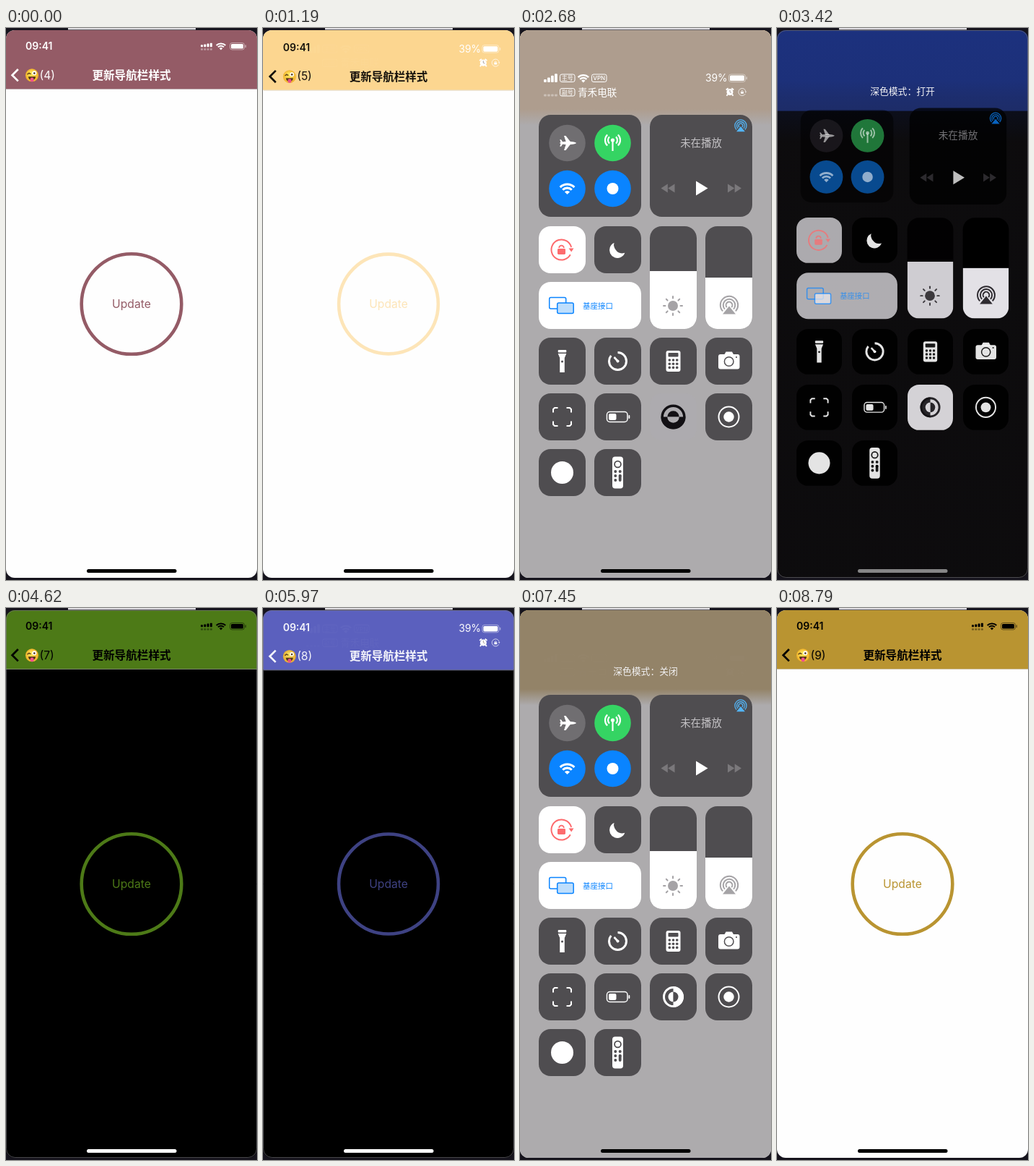
Animation of 348 by 763 pixels, one loop 9690 ms. Source, as an HTML page with a canvas:

```html
<!DOCTYPE html>
<html lang="zh">
<head>
<meta charset="utf-8">
<title>更新导航栏样式</title>
<style>
html, body { margin: 0; width: 100%; height: 100%; overflow: hidden; background: #16141d; }
canvas { display: block; width: 348px; height: 763px; }
</style>
</head>
<body>
<canvas id="stage"></canvas>
<script>
const W = 348, H = 763, LOOP = 9690, STEP = LOOP / 65, TAU = Math.PI * 2;
const canvas = document.getElementById('stage');
const dpr = window.devicePixelRatio || 1;
canvas.width = W * dpr;
canvas.height = H * dpr;
const g = canvas.getContext('2d');
const FONT = 'Inter, "Noto Sans CJK SC", "Noto Sans CJK", sans-serif';
const CJK = '"Noto Sans CJK SC", "Noto Sans CJK", sans-serif';

const WHITE = [255, 255, 255], BLACK = [0, 0, 0], BLUE = '#0a84ff';
const PALE = [236, 234, 239], GREY_TILE = [79, 77, 80];

// Each update of the bar: start, fade time, tint, foreground, dark mode
const STATES = [
  { at: 0, dur: 1, tint: [148, 91, 102], fg: WHITE, dark: 0 },
  { at: 120, dur: 400, tint: [252, 214, 144], fg: BLACK, dark: 0 },
  { at: 2720, dur: 320, tint: [28, 49, 126], fg: WHITE, dark: 1 },
  { at: 4150, dur: 320, tint: [77, 122, 23], fg: BLACK, dark: 1 },
  { at: 4640, dur: 400, tint: [91, 96, 190], fg: WHITE, dark: 1 },
  { at: 7140, dur: 320, tint: [185, 148, 49], fg: BLACK, dark: 0 }
];

const clamp = v => Math.max(0, Math.min(1, v));
const lerp = (a, b, k) => a + (b - a) * k;
const mix = (a, b, k) => a.map((v, i) => lerp(v, b[i], k));
const rgb = (c, a = 1) => `rgba(${c.map(Math.round).join()},${a})`;
function ease(t, at, dur) {
  const u = clamp((t - at) / dur);
  return u * u * (3 - 2 * u);
}

function faded(alpha, draw) {
  if (alpha <= 0) return;
  g.save();
  g.globalAlpha *= alpha;
  draw();
  g.restore();
}
function moved(x, y, draw, scale = 1, turn = 0) {
  g.save();
  g.translate(x, y);
  g.rotate(turn);
  g.scale(scale, scale);
  draw();
  g.restore();
}
function ink(color, width = 1) {
  g.fillStyle = g.strokeStyle = color;
  g.lineWidth = width;
}
function box(x, y, w, h, r) {
  g.beginPath();
  g.roundRect(x, y, w, h, r);
}
function fillBox(x, y, w, h, r = 0) { box(x, y, w, h, r); g.fill(); }
function lineBox(x, y, w, h, r = 0) { box(x, y, w, h, r); g.stroke(); }
function dot(x, y, r) { g.beginPath(); g.arc(x, y, r, 0, TAU); g.fill(); }
function arc(x, y, r, from = 0, to = TAU) { g.beginPath(); g.arc(x, y, r, from, to); g.stroke(); }
function path(points, close) {
  g.beginPath();
  points.forEach(([x, y]) => g.lineTo(x, y));
  if (close) { g.closePath(); g.fill(); } else g.stroke();
}
function text(s, x, y, size, weight = 400, align = 'left', font = FONT) {
  g.font = `${weight} ${size}px ${font}`;
  g.textAlign = align;
  g.textBaseline = 'alphabetic';
  g.fillText(s, x, y);
}

// ---- icons, drawn in the current ink ----
function wifi(x, y, r) {
  const a = -Math.PI * .75, b = -Math.PI * .25;
  g.lineWidth = r * .2;
  arc(x, y, r * .9, a, b);
  arc(x, y, r * .57, a, b);
  g.beginPath();
  g.moveTo(x, y);
  g.arc(x, y, r * .33, a, b);
  g.fill();
}
function battery(x, y, w, h) {
  faded(.45, () => {
    g.lineWidth = 1;
    lineBox(x + .5, y + .5, w - 3, h - 1, 3);
    fillBox(x + w - 1.5, y + h / 2 - 2, 1.5, 4, 1);
  });
  fillBox(x + 2, y + 2, w - 6, h - 4, 1.6);
}
function airplay(x, y, scale, color) {
  moved(x, y, () => {
    ink(color, 2);
    for (const r of [4.4, 8.3, 12.2]) arc(0, 0, r, Math.PI * .76, Math.PI * 2.24);
    path([[0, 1.5], [9, 12.5], [-9, 12.5]], true);
  }, scale);
}
function plane(x, y) {
  moved(x, y, () => {
    g.beginPath();
    g.ellipse(0, 0, 11.5, 2.2, 0, 0, TAU);
    g.fill();
    for (const s of [-1, 1]) {
      path([[4, s], [-3, 10 * s], [-5.5, 10 * s], [-2.5, s]], true);
      path([[-7, s], [-9.5, 4.8 * s], [-11.3, 4.8 * s], [-10, s]], true);
    }
  });
}
function antenna(x, y) {
  dot(x, y - 3, 2.6);
  g.lineWidth = 2.2;
  path([[x, y - 2], [x, y + 12]]);
  for (const r of [6.5, 10.5]) {
    arc(x, y - 3, r, -.8, .8);
    arc(x, y - 3, r, Math.PI - .8, Math.PI + .8);
  }
}
function rotationLock(x, y, scale) {
  moved(x, y, () => {
    g.lineWidth = 2;
    arc(0, 0, 14, .5, TAU - .25);
    path([[10, -2], [17, -2], [13.7, 3]], true);
    fillBox(-5.5, -1.5, 11, 8, 1.4);
    g.lineWidth = 1.8;
    arc(0, -2.5, 3.3, Math.PI, TAU);
  }, scale);
}
function alarm(x, y) {
  dot(x, y, 4.5);
  g.lineWidth = 1.8;
  for (const s of [-1, 1]) {
    path([[x + 2.3 * s, y - 5.2], [x + 5.2 * s, y - 3]]);
    path([[x + 3 * s, y + 3], [x + 4.5 * s, y + 5.2]]);
  }
  g.strokeStyle = '#a09590';
  g.lineWidth = .9;
  path([[x, y - 2.8], [x, y], [x + 2, y + 1]]);
}
function sun(x, y) {
  dot(x, y, 7);
  g.lineWidth = 2;
  g.lineCap = 'round';
  for (let i = 0; i < 8; i++) {
    const a = i * TAU / 8, c = Math.cos(a), s = Math.sin(a);
    path([[x + c * 10.5, y + s * 10.5], [x + c * 13, y + s * 13]]);
  }
}
function moon(x, y) {
  g.beginPath();
  g.arc(x, y, 11, -2, 0.35, true);
  g.quadraticCurveTo(x + 2, y + 6, x - 2, y);
  g.quadraticCurveTo(x - 6, y - 5, x - 4.5, y - 10);
  g.fill();
}
function halves(color, paper, x, y, scale, turn) {
  moved(x, y, () => {
    ink(color, 3);
    g.beginPath(); g.arc(0, 0, 14.3, Math.PI / 2, Math.PI * 1.5); g.fill();
    g.beginPath(); g.arc(0, 0, 7, -Math.PI / 2, Math.PI / 2); g.fill();
    g.fillStyle = paper;
    g.beginPath(); g.arc(0, 0, 7, Math.PI / 2, Math.PI * 1.5); g.fill();
    arc(0, 0, 13);
  }, scale, turn);
}
function emoji(x, y) {
  moved(x, y, () => {
    const skin = g.createRadialGradient(-1, -3, 1, 0, 0, 9.5);
    skin.addColorStop(0, '#ffe95a');
    skin.addColorStop(1, '#f0ad25');
    g.fillStyle = skin;
    dot(0, 0, 9);
    ink('#5a3a14', 1.4);
    path([[-6.5, -1.2], [-4, -3], [-1.6, -1.6]]);
    g.fillStyle = '#fff';
    dot(3.3, -3, 3);
    g.fillStyle = '#4a3013';
    dot(3.3, -2.8, 1.3);
    g.beginPath(); g.arc(0, 2, 5, 0, Math.PI); g.fill();
    g.fillStyle = '#f0508f';
    fillBox(-2.4, 3.2, 5, 5.8, 2.4);
  });
}

// ---- app page: shrinks and blurs behind the control centre ----
function drawApp(s) {
  const tint = rgb(s.tint), fg = rgb(s.fg), p = s.open, scale = 1 - .15 * p;
  const shown = clamp(1 - 2 * p);
  g.fillStyle = rgb(mix([254, 254, 254], BLACK, s.dark));
  g.fillRect(0, 0, W, H);
  g.fillStyle = tint;
  g.fillRect(0, 0, W, lerp(H / 2, 84, scale));
  faded(shown, () => {
    g.translate(W / 2, H / 2);
    g.scale(scale, scale);
    g.translate(-W / 2, -H / 2);
    if (p > .001) g.filter = `blur(${18 * p}px)`;
    g.fillStyle = rgb(mix(s.tint, [200, 200, 200], .6));
    g.fillRect(0, 84, W, .8);
    ink(fg);
    text('09:41', 27, 30.3, 14, 600);
    text('更新导航栏样式', 174, 70.8, 15.6, 700, 'center', CJK);
    text(`(${s.count})`, 46.5, 70.6, 15.6);
    g.lineWidth = 2.7;
    path([[16.8, 57], [8.6, 65.2], [16.8, 73.4]]);
    emoji(36, 65.3);
    faded(clamp(1 - 8 * p), () => {
      ink(tint, 4.6);
      arc(174, 381.5, 69.3);
      text('Update', 174, 387, 15.7, 400, 'center');
    });
  });
  faded(clamp(1 - p * 30), () => {
    ink(fg);
    for (let i = 0; i < 4; i++) {
      fillBox(270 + i * 4.3, 23.2 - i * .8, 3, 3 + i * .8, .8);
      faded(.4, () => fillBox(270 + i * 4.3, 28.3, 3, 2.4, .8));
    }
    wifi(298, 30.4, 10);
    battery(310, 20, 23, 10.5);
  });
}

// ---- control centre ----
function drawBackdrop(s) {
  const base = mix([173, 171, 173], [33, 30, 34], s.dark);
  const top = mix(mix(s.tint, [122, 119, 141], .6), s.tint, s.dark);
  const grad = g.createLinearGradient(0, 0, 0, 160);
  grad.addColorStop(0, rgb(top));
  grad.addColorStop(.45, rgb(mix(top, base, .12 * s.dark)));
  grad.addColorStop(lerp(.7, .6, s.dark), rgb(mix(top, base, .45 * s.dark)));
  grad.addColorStop(lerp(.84, .98, s.dark), rgb(base));
  faded(s.open ** 2.5, () => {
    g.fillStyle = grad;
    g.fillRect(0, 0, W, H);
  });
}

function drawStatus(s) {
  const q = 1 - s.open, notice = s.notice;
  faded(s.open * (1 - notice), () => moved(28 * q, -42 * q, () => {
    ink('#fff');
    for (let i = 0; i < 4; i++) {
      const h = 4 + i * 2.6;
      fillBox(33 + i * 5, 75 - h, 3.8, h, 1);
      faded(.35, () => fillBox(33 + i * 5, 91.5, 3.8, 3, 1));
    }
    wifi(87.8, 75.5, 11.5);
    text('青禾电联', 80, 93.7, 13.6, 500, 'left', CJK);
    g.lineWidth = 1;
    [['主号', 55.5, 64], ['副号', 55.5, 83.5], ['VPN', 99.5, 64]].forEach(([label, x, y]) => {
      lineBox(x, y, 20.5, 10.5, 2.5);
      text(label, x + 10.2, y + 8.4, 8, 500, 'center');
    });
  }));
  faded(clamp(s.open * 30) * (1 - notice), () => moved(15 * q, -42 * q, () => {
    ink('#fff');
    text('39%', 257, 74, 13.8);
    battery(289, 63.5, 26, 11.5);
    alarm(291, 88.5);
    ink('#fff');
    rotationLock(308, 88.5, .36);
  }));
  faded(notice * clamp(s.open * 1.5), () => {
    ink('#f2f2f4');
    text(`深色模式：${s.word}`, 174, 92, 12.8, 400, 'center', CJK);
  });
}

function drawPanel(s) {
  const p = s.open, q = 1 - p, d = s.dark;
  const dim = rgb(mix(GREY_TILE, BLACK, d));
  const pale = rgb(mix(WHITE, PALE, d));
  const dark = rgb(mix([165, 163, 166], [40, 37, 42], d));

  function tile(x, y, w, h, fill, draw, shrink = .1, slow = .3) {
    const cx = x + w / 2, cy = y + h / 2;
    faded(p ** slow * clamp((p - .04) * 4), () => {
      g.translate(cx, cy - 42 * q);
      g.scale(1 - shrink * q, 1 - shrink * q);
      g.translate(-cx, -cy);
      g.fillStyle = fill;
      fillBox(x, y, w, h, 16.5);
      ink('#fff', 2);
      draw(cx, cy);
    });
  }
  const small = (col, y, draw, fill = dim) => tile(26 + col * 77, y, 65, 65, fill, draw);

  tile(26, 120, 142, 141, dim, () => {
    ink(rgb(mix([112, 110, 113], [40, 38, 45], d)));
    dot(65.5, 159, 25.3);
    ink('#35d463');
    dot(128.5, 159, 25.3);
    ink(BLUE);
    dot(65.5, 222, 25.3);
    dot(128.5, 222, 25.3);
    ink('#fff');
    plane(66.5, 159);
    antenna(128.5, 158);
    wifi(65.5, 230, 15.5);
    dot(128.5, 222, 8);
  }, .3, 1.6);

  tile(180, 120, 142, 141, dim, () => {
    airplay(306, 135, .66, rgb(mix([83, 180, 245], [10, 132, 255], d)));
    ink(rgb(mix([196, 194, 197], [154, 152, 156], d)));
    text('未在播放', 251, 164.3, 14.4, 400, 'center', CJK);
    ink(rgb(mix([122, 120, 123], [58, 56, 61], d)));
    for (const [x, way] of [[205, -1], [297.5, 1]])
      for (const o of [-9.5, .2])
        path([[x + way * o, 215.5], [x + way * (o + 9.3), 221.5], [x + way * o, 227.5]], true);
    ink('#fff');
    path([[244, 211.5], [260.5, 221.5], [244, 231.5]], true);
  }, .17, .8);

  tile(26, 274, 65, 65, pale, () => {
    ink('#fd6b6d');
    rotationLock(57.5, 306.5, 1);
  }, .1, .9);
  small(1, 274, () => moon(135, 307));

  const slider = (x, level, icon, slow) => tile(x, 274, 65, 142, dim, () => {
    g.save();
    box(x, 274, 65, 142, 16.5);
    g.clip();
    g.fillStyle = pale;
    g.fillRect(x, level, 65, 416 - level);
    g.restore();
    ink(dark);
    icon();
  }, .06, slow);
  slider(180, 336, () => sun(212, 384), .35);
  slider(257, 345, () => airplay(290, 383, 1, dark), .1);

  tile(26, 351, 142, 65, pale, () => {
    ink(BLUE, 1.5);
    lineBox(40.7, 372.5, 23, 15.5, 2);
    g.fillStyle = rgb(mix([190, 222, 252], PALE, d));
    box(51.7, 380, 22.5, 14.5, 2);
    g.fill();
    g.stroke();
    ink(BLUE);
    text('基座接口', 87, 387.5, 10.5, 400, 'left', CJK);
  }, .05, .85);

  small(0, 428, () => {
    fillBox(52.7, 445, 11.6, 3.4, 1);
    path([[52.7, 450], [64.3, 450], [61.8, 456], [61.8, 476], [55.2, 476], [55.2, 456]], true);
    ink(dim);
    dot(58.5, 461, 1.5);
  });
  small(1, 428, (x, y) => {
    g.lineWidth = 3;
    arc(x, y, 12, -Math.PI / 2, Math.PI * 1.22);
    g.lineWidth = 2.6;
    path([[x - 5, y - 5.5], [x + 1, y + 1]]);
    dot(x, y, 2);
  });
  small(2, 428, () => {
    fillBox(202.5, 446, 20, 29, 3);
    ink(dim);
    fillBox(205.5, 449, 14, 5.5, 1);
    for (let i = 0; i < 9; i++) dot(207.3 + i % 3 * 5.2, 459 + Math.floor(i / 3) * 5.2, 1.8);
  });
  small(3, 428, () => {
    fillBox(275, 451, 29.5, 20.5, 3);
    path([[283, 452], [285.5, 447.5], [294, 447.5], [296.5, 452]], true);
    ink(dim, 1.5);
    arc(289.7, 461, 6.3);
    dot(300, 455, 1.1);
  });

  small(0, 505, (x, y) => {
    for (let i = 0; i < 4; i++)
      moved(x, y, () => path([[-12.5, -6], [-12.5, -10.5], [-10.5, -12.5], [-6, -12.5]]), 1, i * TAU / 4);
  });
  small(1, 505, () => {
    g.lineWidth = 1.5;
    lineBox(120.5, 530.5, 28.5, 14, 4);
    fillBox(123, 533, 10.5, 9, 2);
    fillBox(150.5, 535, 1.8, 5, 1);
  });
  const key = mix(mix(GREY_TILE, BLACK, d), PALE, clamp(s.toggle * 1.2));
  small(2, 505, (x, y) => {
    halves(rgb(mix(WHITE, [18, 16, 20], clamp(s.toggle * 2))), rgb(key), x, y,
      1 + .18 * Math.sin(Math.PI * s.toggle), -Math.PI * (1 - s.toggle));
  }, rgb(key));
  small(3, 505, (x, y) => {
    arc(x, y, 14);
    dot(x, y, 7.2);
  });

  small(0, 582, (x, y) => dot(x, y, 15.5));
  small(1, 582, () => {
    fillBox(128, 592.5, 15, 44, 4);
    ink(dim, 1.8);
    arc(135.5, 603, 4.4);
    for (const x of [132.3, 138.7])
      for (const y of [613, 619]) dot(x, y, 2);
    dot(132.3, 625, 2);
    fillBox(136.8, 617, 3.8, 10, 1.9);
  });
}

// ---- timeline ----
function stateAt(t) {
  let i = STATES.length - 1;
  while (STATES[i].at > t) i--;
  const now = STATES[i], was = STATES[Math.max(0, i - 1)], k = ease(t, now.at, now.dur);
  return {
    count: i + 4,
    tint: mix(was.tint, now.tint, k),
    fg: mix(was.fg, now.fg, k),
    dark: lerp(was.dark, now.dark, k),
    open: ease(t, 1080, 950) - ease(t, 3250, 480) + ease(t, 5860, 950) - ease(t, 7700, 480),
    toggle: ease(t, 2500, 367) - ease(t, 7060, 367),
    notice: ease(t, 2800, 250) - ease(t, 3700, 200) + ease(t, 7220, 250) - ease(t, 8150, 200),
    word: t < 5000 ? '打开' : '关闭'
  };
}

function render(t) {
  const s = stateAt(t);
  g.setTransform(dpr, 0, 0, dpr, 0, 0);
  g.fillStyle = '#16141d';
  g.fillRect(0, 0, W, H);
  g.fillStyle = '#dcdade';
  g.fillRect(86, 0, 177, 2.4);
  g.save();
  box(0, 3, W, 757, 12);
  g.clip();
  drawApp(s);
  if (s.open > .001) {
    drawBackdrop(s);
    drawPanel(s);
    drawStatus(s);
  }
  const bar = mix(BLACK, WHITE, s.dark);
  g.fillStyle = rgb(bar, s.dark > .5 && s.notice > .5 ? .5 : 1);
  fillBox(112, 748, 124.5, 5, 2.5);
  g.restore();
  faded(s.dark * .6, () => {
    ink('#77757c', 1);
    lineBox(.5, 3.5, W - 1, 756, 12);
  });
}

// Motion is held for one step of about 149 ms, rounded to 10 ms
function tick(now) {
  const t = now % LOOP;
  render(Math.floor((t + 10) / STEP) * STEP % LOOP);
  requestAnimationFrame(tick);
}
requestAnimationFrame(tick);
</script>
</body>
</html>
```
